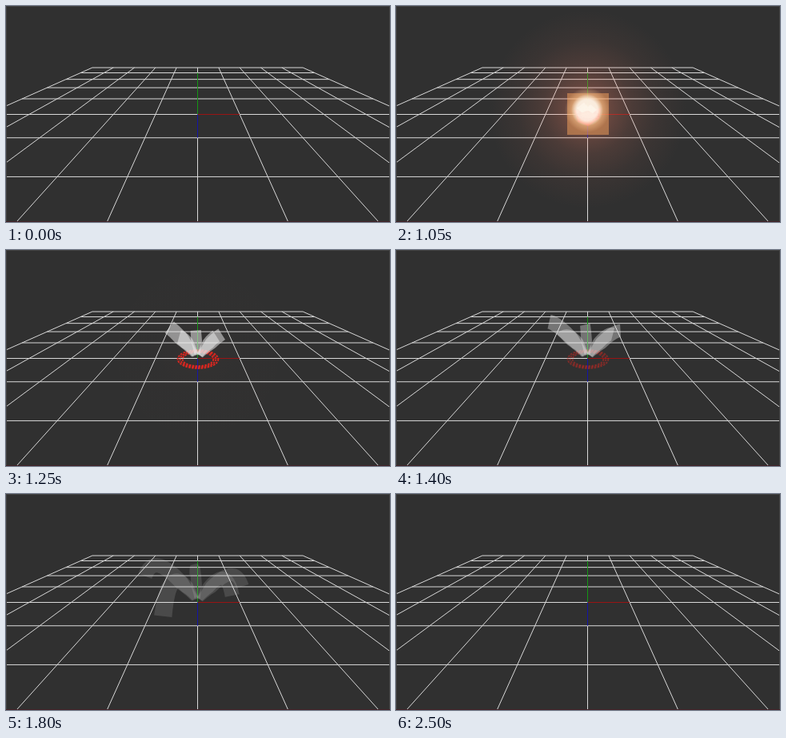
An HTML page with a canvas for the animation above (2550 ms loop, 480 by 270 pixels).

```html
<!DOCTYPE html>
<html lang="en">
<head>
<meta charset="utf-8">
<title>Burst over a grid</title>
<style>
  html, body { margin: 0; width: 100%; height: 100%; overflow: hidden; background: #303030; }
  canvas { display: block; width: 480px; height: 270px; }
</style>
</head>
<body>
<canvas id="stage" width="480" height="270"></canvas>
<script>
const ctx = document.getElementById('stage').getContext('2d');
const LOOP = 2550, STEP = 50, START = 1000, LIFE = 1.5, TRAIL = 0.85, DRAG = 2.5;
const CX = 239.5, CY = 135.5;

// Camera at (0, 2, 4) looking at the origin, 60 degree field of view.
const DIST = Math.hypot(2, 4), SIN = 2 / DIST, COS = 4 / DIST;
const FOCAL = 135 / Math.tan(Math.PI / 6), ASPECT = 1.007;

function project(x, y, z) {
  const s = FOCAL / (DIST - y * SIN - z * COS);
  return [CX + x * s * ASPECT, CY - (y * COS - z * SIN) * s];
}

function line(a, b, color) {
  ctx.strokeStyle = color;
  ctx.lineWidth = 1;
  ctx.beginPath();
  ctx.moveTo(...project(...a));
  ctx.lineTo(...project(...b));
  ctx.stroke();
}

function drawGrid() {
  ctx.fillStyle = '#303030';
  ctx.fillRect(0, 0, 480, 270);
  for (let i = -5; i <= 5; i++) {
    line([i, 0, -5], [i, 0, 4], '#d8d8d8');
    if (i < 4) line([-5, 0, i], [5, 0, i], '#d8d8d8');
  }
  line([0, 0, 0], [1, 0, 0], '#981414');
  line([0, 0, 0], [0, 1, 0], '#149614');
  line([0, 0, 0], [0, 0, 1], '#1414a8');
  ctx.strokeStyle = '#424242';
  ctx.strokeRect(0.5, 0.5, 479, 269);
  ctx.fillStyle = '#432329';
  ctx.fillRect(0, 269, 480, 1);
}

function radial(x, y, r, rgb, stops) {
  const g = ctx.createRadialGradient(x, y, 0, x, y, r);
  for (const [at, alpha] of stops) g.addColorStop(at, `rgba(${rgb},${alpha})`);
  ctx.fillStyle = g;
  ctx.fillRect(x - r, y - r, 2 * r, 2 * r);
}

function polygon(points, fill) {
  ctx.fillStyle = fill;
  ctx.beginPath();
  points.forEach(p => ctx.lineTo(p[0], p[1]));
  ctx.closePath();
  ctx.fill();
}

function drawFlash(t) {
  const k = Math.exp(-16 * t);
  if (k < 0.01) return;
  radial(CX, 129, 124, '255,132,104',
    [[0, k], [0.22, 0.6 * k], [0.45, 0.3 * k], [0.7, 0.11 * k], [1, 0]]);
  if (t < 0.1) {
    ctx.fillStyle = `rgba(255,168,94,${0.92 - 9 * t})`;
    ctx.fillRect(214, 109, 52, 52);
  }
}

function drawCore(t) {
  const k = 1 - t / 0.2;
  if (k <= 0) return;
  const y = 134 - 80 * Math.min(t, 0.1);
  const halo = `255,${228 - 400 * t},${140 + 300 * t}`;
  radial(239, y, 28, halo, [[0, k], [0.5, 0.9 * k], [1, 0]]);
  radial(239, y, 22 - 40 * t, '255,255,252', [[0, k], [0.65, k], [1, 0]]);
}

function drawRing(t) {
  if (t < 0.05 || t >= 0.5) return;
  if (t < 0.2) {
    const s = 0.7 + 3 * t, a = Math.min(0.85, (0.2 - t) * 8.5);
    const shape = [[-20, -6], [20, -9], [17, 6], [1, 17], [-14, 11]];
    polygon(shape.map(([x, y]) => [CX + x * s, CY + y * s]), `rgba(255,92,80,${a})`);
  }
  const grow = Math.min(1, 0.4 + 2.4 * t);
  ctx.strokeStyle = `rgba(232,38,30,${0.9 * Math.min(1, (0.5 - t) / 0.22)})`;
  ctx.lineWidth = 2;
  ctx.setLineDash([2.6, 1.3]);
  for (const r of [25.3, 22.3, 19.3]) {
    ctx.beginPath();
    ctx.ellipse(CX + 0.5, CY + 1, r * grow, r * grow * 0.45, 0, 0, 2 * Math.PI);
    ctx.stroke();
  }
  ctx.setLineDash([]);
}

// Each petal: sideways reach, lift, gravity, ribbon width, width growth.
const petals = [
  [-76, 100, 118, 18, 0],
  [-5, 88, 92, 14, -3],
  [65, 80, 108, 16, 0],
  [-50, 85, 200, 16, 8],
  [50, 78, 130, 15, 4]
];

// Projectile slowed by air.
function place([reach, lift, gravity], s) {
  const e = 1 - Math.exp(-DRAG * s);
  return [CX + reach * e, CY - lift * e + gravity * (s - e / DRAG)];
}

function drawPetal(petal, t, fill) {
  const from = Math.max(0.02, t - TRAIL), n = 24, left = [], right = [];
  for (let i = 0; i <= n; i++) {
    const s = from + (t - from) * i / n;
    const [x, y] = place(petal, s), [nx, ny] = place(petal, s + 0.01);
    const len = Math.hypot(nx - x, ny - y) || 1;
    const w = (petal[3] + petal[4] * s) * Math.min(1, 0.4 + 5 * s) / 2;
    const dx = -(ny - y) / len * w, dy = (nx - x) / len * w;
    left.push([x + dx, y + dy]);
    right.unshift([x - dx, y - dy]);
  }
  polygon(left.concat(right), fill);
}

function drawPetals(t) {
  if (t <= 0) return;
  const a = 0.95 * Math.exp(-2.4 * t) * Math.min(1, (LIFE - t) / 0.3);
  petals.forEach(p => drawPetal(p, t, `rgba(235,235,235,${a})`));
}

function frame(now) {
  const ms = Math.floor(now % LOOP / STEP) * STEP;
  const t = (ms - START) / 1000;
  drawGrid();
  if (t >= 0 && t < LIFE) {
    drawFlash(t);
    drawRing(t);
    drawPetals(t);
    drawCore(t);
  }
}

const begin = performance.now();
function tick() {
  frame(performance.now() - begin);
  requestAnimationFrame(tick);
}
tick();
</script>
</body>
</html>
```
